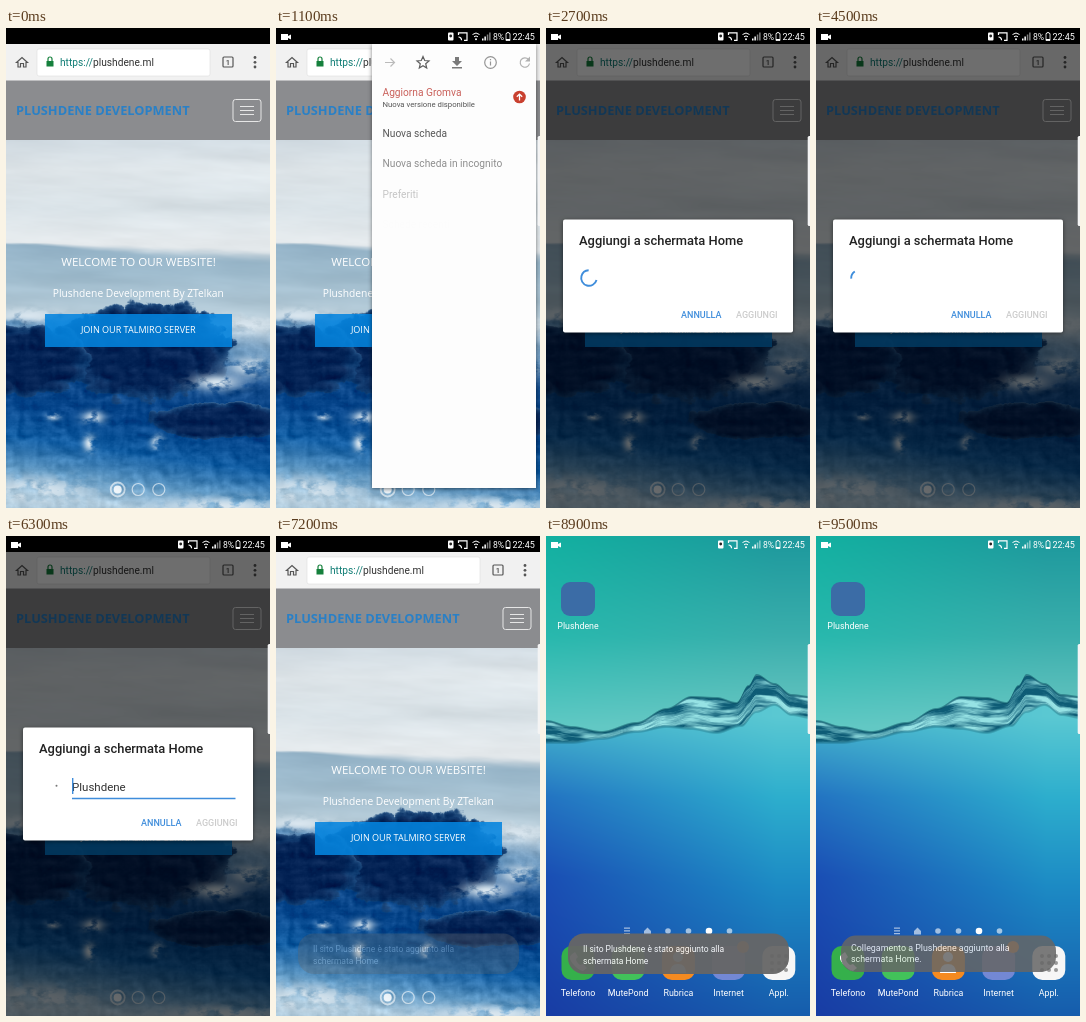
Recreate the animation shown at these times as an HTML page with a canvas. Size 264 px wide and 480 px high, loop 9.6 s.

```html
<!DOCTYPE html>
<html lang="it">
<head>
<meta charset="utf-8">
<title>Aggiungi a schermata Home</title>
<style>
html, body { margin: 0; width: 100%; height: 100%; overflow: hidden; background: #000; }
#stage { position: relative; width: 264px; height: 480px; overflow: hidden; }
#stage canvas, #stage svg, #page { position: absolute; left: 0; top: 0; width: 264px; height: 480px; }
text { font-family: Roboto, sans-serif; white-space: pre; }
.web text { font-family: "Open Sans", sans-serif; fill: #fff; text-anchor: middle; }
.line { fill: none; stroke: #555; stroke-width: 1.2; }
.label text { font-size: 8.9px; fill: #fff; text-anchor: middle; }
.toast text { fill: #fff; }
#menu > rect:first-child, #dialog > rect { filter: drop-shadow(0 1px 2px rgba(0,0,0,.5)); }
</style>
</head>
<body>
<div id="stage">
  <canvas id="wall" width="264" height="480"></canvas>
  <svg viewBox="0 0 264 480" class="label">
    <rect x="15" y="46" width="34" height="34" rx="9" fill="#3b6ca6"/>
    <text x="32" y="93">Plushdene</text>
    <g fill="#fff" fill-opacity=".6">
      <path d="M78 391.500h6v1.300h-6zm0 2.700h6v1.300h-6zm0 2.700h6v1.300h-6zM98 395l3.500-3.500 3.500 3.500v3.500h-7z"/>
      <circle cx="122" cy="395" r="2.800"/><circle cx="142.500" cy="395" r="2.800"/><circle cx="183.500" cy="395" r="2.800"/>
      <circle cx="163" cy="395" r="3.300" fill-opacity="1"/>
    </g>
    <g id="dock"></g>
    <path d="M25 419q-3 3 2 9t10 7l4-3-4-4-3 1q-4-3-4-6l2-2-3-5z" fill="#fff"/>
    <path d="M124 437q0-9 8-9t8 9z" fill="#fff"/><circle cx="132" cy="421" r="5" fill="#fff"/>
    <circle cx="197" cy="411" r="6" fill="#ef8a3c"/>
    <g id="grid" fill="#999"></g>
  </svg>

  <div id="page">
    <canvas id="sky" width="264" height="480"></canvas>
    <svg viewBox="0 0 264 480">
      <rect width="264" height="16"/>
      <rect y="16" width="264" height="37" fill="#f1f1f1"/>
      <path class="line" d="M10.500 34.500l5.500-5 5.500 5h-1.500v4.500h-2.500v-3.500h-3v3.500h-2.500v-4.500z"/>
      <rect x="31" y="21" width="173" height="27" rx="2" fill="#fff" stroke="#ddd" stroke-width=".6"/>
      <rect x="40.500" y="33" width="7" height="5.500" fill="#15803c"/>
      <path d="M42 33v-2a2 2 0 0 1 4 0v2" fill="none" stroke="#15803c" stroke-width="1.200"/>
      <text x="54" y="38" font-size="10.200" fill="#333"><tspan fill="#0e7c74">https://</tspan>plushdene.ml</text>
      <rect class="line" x="217" y="29" width="10" height="10" rx="1"/>
      <text x="222" y="36.800" font-size="7.500" font-weight="500" text-anchor="middle" fill="#444">1</text>
      <g fill="#555"><circle cx="249" cy="29.500" r="1.400"/><circle cx="249" cy="34.300" r="1.400"/><circle cx="249" cy="39" r="1.400"/></g>
      <circle id="ripple" cx="249" cy="34" r="13" fill="#000"/>
      <rect y="52.500" width="264" height="59.500" fill="#8b8c8f"/>
      <g class="web">
        <text x="10" y="87" font-size="12.800" font-weight="700" style="fill:#2a80c6;text-anchor:start">PLUSHDENE DEVELOPMENT</text>
        <g fill="none" stroke="#e6e6e6">
          <rect x="227" y="71.500" width="28" height="22" rx="2.500"/>
          <path d="M234 78.500h14M234 82.500h14M234 86.500h14" stroke-width="1.200"/>
        </g>
        <text x="132.500" y="238" font-size="11.550">WELCOME TO OUR WEBSITE!</text>
        <text x="132.300" y="269" font-size="10.280">Plushdene Development By ZTelkan</text>
        <rect x="39" y="286" width="187" height="33" fill="#0484e0" fill-opacity=".88"/>
        <text x="132.300" y="304.500" font-size="9.050">JOIN OUR TALMIRO SERVER</text>
        <g fill="none" stroke="#fff" stroke-opacity=".6" stroke-width="1.200">
          <circle cx="111.700" cy="461.500" r="7" stroke-width="1.800"/><circle cx="132.200" cy="461.500" r="6"/><circle cx="152.800" cy="461.500" r="6"/>
        </g>
        <circle cx="111.700" cy="461.500" r="4" fill="#fff" fill-opacity=".85"/>
      </g>
    </svg>
  </div>

  <svg viewBox="0 0 264 480">
    <g id="menu">
      <rect x="96" y="16" width="164" height="444" fill="#fdfdfd"/>
      <rect id="pressed" x="96" y="338" width="164" height="30.500" fill="#ddd"/>
      <g id="icons">
        <path class="line" style="stroke:#bbb" d="M109 34.500h9M114.500 30.500l4 4-4 4"/>
        <path class="line" d="M147 28.500l1.700 4 4.300.4-3.300 2.800 1 4.300-3.700-2.300-3.700 2.300 1-4.300-3.300-2.800 4.300-.4z"/>
        <path d="M179 29h4v4h3l-5 5-5-5h3zM176 39h10v1.500h-10z" fill="#555"/>
        <g><circle class="line" cx="214.500" cy="34.500" r="5.800"/><path class="line" d="M214.500 33.500v4M214.500 31v1.300"/></g>
        <g><path class="line" d="M252.500 31.500a4.700 4.700 0 1 0 1 4"/><path d="M254 28.500v5h-5z" fill="#555"/></g>
      </g>
      <g id="rows" font-size="10.200" fill="#222">
        <g>
          <text x="106.500" y="67.500" fill="#c9605a">Aggiorna Gromva</text>
          <text x="106.500" y="79" font-size="7.750" fill="#555">Nuova versione disponibile</text>
          <circle cx="243.500" cy="69" r="6.300" fill="#c9402f"/>
          <path d="M243.500 72.500v-6M240.800 68.800l2.700-2.700 2.700 2.700" fill="none" stroke="#fff" stroke-width="1.300"/>
        </g>
      </g>
    </g>

    <rect id="dim" y="16" width="264" height="464"/>
    <g id="dialog">
      <rect x="17" y="191.500" width="230" height="113" rx="2" fill="#fff"/>
      <text x="33" y="217" font-size="12.900" font-weight="500" fill="#222">Aggiungi a schermata Home</text>
      <circle id="spinner" cx="43" cy="250" r="7.800" pathLength="360" fill="none" stroke="#3f8ddb" stroke-width="1.900"/>
      <g id="field">
        <circle cx="50.500" cy="249.700" r="1" fill="#777"/>
        <text x="66" y="254.500" font-size="11.500" fill="#333">Plushdene</text>
        <path d="M66 262.500h163.500M66.700 242v16" stroke="#3f8ddb" stroke-width="1.400"/>
      </g>
      <g font-size="9" font-weight="500">
        <text x="135" y="290" fill="#3f8ddb">ANNULLA</text>
        <text id="add" x="190" y="290">AGGIUNGI</text>
      </g>
    </g>

    <g id="siteToast" class="toast" font-size="8.500">
      <rect x="22" y="397.500" width="221" height="40.500" rx="16" fill="#666"/>
      <text x="37" y="415.500">Il sito Plushdene è stato aggiunto alla</text><text x="37" y="428">schermata Home</text>
    </g>
    <g id="linkToast" class="toast" font-size="8.900">
      <rect x="25" y="399.500" width="215" height="36.500" rx="15" fill="#666"/>
      <text x="35" y="414.500">Collegamento a Plushdene aggiunto alla</text><text x="35" y="426">schermata Home.</text>
    </g>

    <g id="status" fill="#fff">
      <path d="M5 6h7v2l3-1.500v5l-3-1.500v2h-7z"/>
      <rect x="172" y="4.500" width="5.500" height="8" rx="1"/><circle cx="174.700" cy="8" r="1.400" fill="#222"/>
      <path d="M182.500 7v-2.200h8.500v7.500h-3M182.500 9a3 3 0 0 1 3 3.300" fill="none" stroke="#fff" stroke-width="1.200"/>
      <path d="M196.500 6.500q3.500-3 7 0M198 8.800q2-1.700 4 0" fill="none" stroke="#fff" stroke-width="1"/><circle cx="200" cy="11.300" r="1"/>
      <path d="M206 12.500v-2h1.500v2zm2.400 0v-4h1.500v4z"/><path d="M210.800 12.500v-6h1.500v6zm2.300 0v-8h1.500v8z" opacity=".5"/>
      <text x="217" y="12.200" font-size="8.600">8%</text>
      <path d="M230 5.500h1v-1h2v1h1v7h-4z" fill="none" stroke="#fff" stroke-width=".8"/><path d="M230 11h4v1.500h-4z"/>
      <text x="236.500" y="12.200" font-size="9">22:45</text>
      <rect x="261.700" y="108" width="4" height="90" rx="1.500" fill="#f4f4f4"/>
    </g>
  </svg>
</div>

<script>
const LOOP = 9600;
const $ = id => document.getElementById(id);
const clamp = v => Math.min(1, Math.max(0, v));
const smooth = v => (v = clamp(v), v * v * (3 - 2 * v));
const ramp = (t, a, b) => smooth((t - a) / (b - a));
const mix = (a, b, k) => a.map((v, i) => v + (b[i] - v) * clamp(k));

// Value noise, soft (fbm) or with rounded bumps (billow)
const hash = (x, y) => { const s = Math.sin(x * 127.1 + y * 311.7) * 43758.5453; return s - Math.floor(s); };
function noise(x, y) {
  const ix = Math.floor(x), iy = Math.floor(y), u = smooth(x - ix), v = smooth(y - iy);
  const row = j => hash(ix, iy + j) * (1 - u) + hash(ix + 1, iy + j) * u;
  return row(0) * (1 - v) + row(1) * v;
}
function octaves(x, y, shape) {
  let sum = 0;
  for (let o = 0, a = .53; o < 4; o++, a /= 2) sum += a * shape(noise(x * 2 ** o + o * 17, y * 2 ** o + o * 31));
  return sum;
}
const fbm = (x, y) => octaves(x, y, n => n);
const billow = (x, y) => octaves(x, y, n => Math.abs(2 * n - 1));

// Blends between [position, ...values] stops
function blend(stops, p, ease = clamp) {
  let i = 1;
  while (i < stops.length - 1 && p > stops[i][0]) i++;
  const [a, ...from] = stops[i - 1], [b, ...to] = stops[i];
  return mix(from, to, ease((p - a) / (b - a)));
}
const curve = (points, x) => blend(points, x, smooth)[0];

function paint(canvas, shade) {
  const ctx = canvas.getContext('2d'), img = ctx.createImageData(264, 480);
  for (let y = 0, i = 0; y < 480; y++)
    for (let x = 0; x < 264; x++, i += 4) img.data.set([...shade(x, y), 255], i);
  ctx.putImageData(img, 0, 0);
}

const HAZE = [[112, 210, 220, 227], [140, 223, 230, 234], [180, 217, 226, 231], [213, 228, 233, 236]];
const AIR = [[213, 146, 177, 198], [245, 158, 187, 205], [285, 180, 202, 215]];
const DEEP = [[280, 192, 209, 220], [312, 90, 140, 184], [340, 18, 74, 138], [390, 3, 66, 136], [425, 16, 92, 162], [455, 92, 150, 194], [480, 168, 197, 216]];
// Ellipses: x, y, rx, ry
const MASSES = [[140, 322, 86, 50], [20, 332, 64, 36], [215, 392, 74, 18]];
const PUFFS = [[22, 287, 36, 8], [240, 297, 36, 9], [245, 338, 26, 11], [210, 354, 28, 9], [47, 388, 7, 4],
  [87, 389, 12, 7], [83, 415, 7, 9], [151, 414, 7, 8], [30, 462, 60, 14], [215, 478, 70, 10]];
const within = (x, y, [cx, cy, rx, ry]) => 1 - ((x - cx) / rx) ** 2 - ((y - cy) / ry) ** 2;

function sky(x, y) {
  const wisp = fbm(x / 80, (y - x * .05) / 13) - .5;
  const edge = 213 + x * .03 + wisp * 8;
  let c = mix(blend(HAZE, y), blend(AIR, y), smooth((y - edge) / (3 + x / 18)));
  c = c.map(v => v + wisp * 22);
  if (y < 250) return c;

  const bump = billow(x / 18, y / 15);
  const relief = (billow(x / 18 - .12, y / 15 + .18) - billow(x / 18 + .1, y / 15 - .15)) * 45;
  const ground = smooth((y - 290 + bump * 14) / 8);
  c = mix(c, blend(DEEP, y + (130 - x) * .14).map(v => v + relief), ground);
  for (const mass of MASSES) {
    const depth = within(x, y, mass) + (bump - .27) * .7;
    const facing = clamp((mass[1] - y) / mass[3] + (x - mass[0]) / 400);
    const body = mix([22, 72, 126], [3, 34, 84], depth * 2).map(v => v + relief * .7);
    c = mix(c, mix(body, [176, 203, 222], facing * Math.exp(-Math.max(0, depth) / .07)), smooth(depth / .14));
  }
  for (const puff of PUFFS) {
    const r = 1 - within(x, y, puff);
    if (r < 4) c = mix(c, [216, 229, 238], Math.exp(-r * 1.3) * clamp((fbm(x / 11, y / 7) - .3) * 4));
  }
  return c;
}

const ABOVE_LEFT = [[0, 18, 176, 160], [100, 40, 184, 173], [190, 95, 200, 196]];
const ABOVE_RIGHT = [[0, 28, 152, 156], [100, 58, 174, 172], [190, 108, 200, 196]];
const BELOW_LEFT = [[190, 66, 176, 204], [260, 35, 116, 194], [340, 26, 78, 180], [480, 24, 60, 164]];
const BELOW_RIGHT = [[180, 90, 200, 210], [260, 45, 174, 205], [350, 28, 138, 196], [480, 22, 92, 172]];
const WAVE_TOP = [[0, 184], [25, 190], [55, 195], [90, 186], [120, 172], [145, 160], [170, 161], [190, 166], [202, 149], [210, 138], [228, 147], [245, 158], [264, 160]];
const WAVE_LOW = [[0, 207], [25, 207], [55, 203], [90, 196], [120, 191], [145, 193], [170, 197], [195, 190], [210, 176], [228, 169], [245, 179], [264, 182]];

function wallpaper(x, y) {
  const top = curve(WAVE_TOP, x), low = curve(WAVE_LOW, x), middle = (top + low) / 2;
  const [left, right] = y < middle ? [ABOVE_LEFT, ABOVE_RIGHT] : [BELOW_LEFT, BELOW_RIGHT];
  let c = mix(blend(left, y), blend(right, y), x / 230);
  const inside = Math.min(y - top, low - y);
  if (inside > -1) {
    const streak = fbm(x / 26, (y - middle) / 4);
    const water = mix([14, 92, 118], [150, 226, 228], (streak - .3) * 2.3);
    const fadeDown = 1 - .5 * (y - top) / (low - top);
    c = mix(c, mix([12, 84, 102], water, inside / 2.5), (inside + 1) / 2 * fadeDown);
  }
  return c;
}

paint($('sky'), sky);
paint($('wall'), wallpaper);

$('dock').innerHTML = [['Telefono', '#35b04b'], ['MutePond', '#42c25a'], ['Rubrica', '#f58a20'], ['Internet', '#7388d4'], ['Appl.', '#f6f6f6']]
  .map(([name, color], i) => `<rect x="${15.5 + i * 50.2}" y="410" width="33" height="34" rx="10" fill="${color}"/>
    <text x="${32 + i * 50.2}" y="460">${name}</text>`).join('');
for (let i = 0; i < 9; i++)
  $('grid').innerHTML += `<circle cx="${226 + i % 3 * 7}" cy="${420 + Math.floor(i / 3) * 7}" r="2"/>`;

$('rows').innerHTML += ['Nuova scheda', 'Nuova scheda in incognito', 'Preferiti', 'Schede recenti', 'Cronologia', 'Download',
  'Condividi…', 'Trova nella pagina', 'Aggiungi a schermata Home', 'Sito desktop', 'Impostazioni', 'Guida e feedback']
  .map((name, i) => `<text x="106.5" y="${108.7 + i * 30.5}">${name}</text>`).join('');

const fade = (id, v) => {
  const s = $(id).style;
  s.opacity = v;
  s.visibility = v > 0 ? 'visible' : 'hidden';
};
const stagger = (id, t, start, step) =>
  [...$(id).children].forEach((el, i) => el.style.opacity = clamp((t - start - i * step) / 180));

function draw(t) {
  fade('status', ramp(t, 50, 300));
  fade('ripple', .12 * ramp(t, 650, 800) * (1 - ramp(t, 900, 1100)));

  const grow = .4 + .6 * ramp(t, 860, 1060);
  fade('menu', ramp(t, 860, 980) * (1 - ramp(t, 2180, 2380)));
  $('menu').setAttribute('transform', `translate(260 16) scale(${grow}) translate(-260 -16)`);
  stagger('icons', t, 900, 30);
  stagger('rows', t, 920, 45);
  fade('pressed', ramp(t, 2050, 2150));

  const open = ramp(t, 2350, 2600) * (1 - ramp(t, 6880, 7120));
  fade('dim', open * .57);
  fade('dialog', open);
  const loading = t < 6100;
  fade('spinner', loading ? open : 0);
  fade('field', loading ? 0 : open);
  $('add').setAttribute('fill', t < 6800 ? '#ccc' : '#3f8ddb');

  const turns = Math.max(0, t - 2030) / 1333, p = turns % 1;
  const head = 240 * smooth(p * 2), tail = 240 * smooth(p * 2 - 1);
  const angle = 15 + (t - 2700) * .25 + Math.floor(turns) * 240 + tail;
  $('spinner').setAttribute('stroke-dasharray', `${head - tail + 12} 360`);
  $('spinner').setAttribute('transform', `rotate(${angle} 43 250)`);

  const leave = ramp(t, 8350, 8750);
  fade('page', 1 - leave);
  $('page').style.transform = `scale(${1 - .15 * leave})`;

  fade('siteToast', .95 * ramp(t, 7080, 7400) * (1 - ramp(t, 9050, 9350)));
  fade('linkToast', .95 * ramp(t, 9340, 9540));
}

function tick() {
  draw(performance.now() % LOOP);
  requestAnimationFrame(tick);
}
tick();
</script>
</body>
</html>
```
